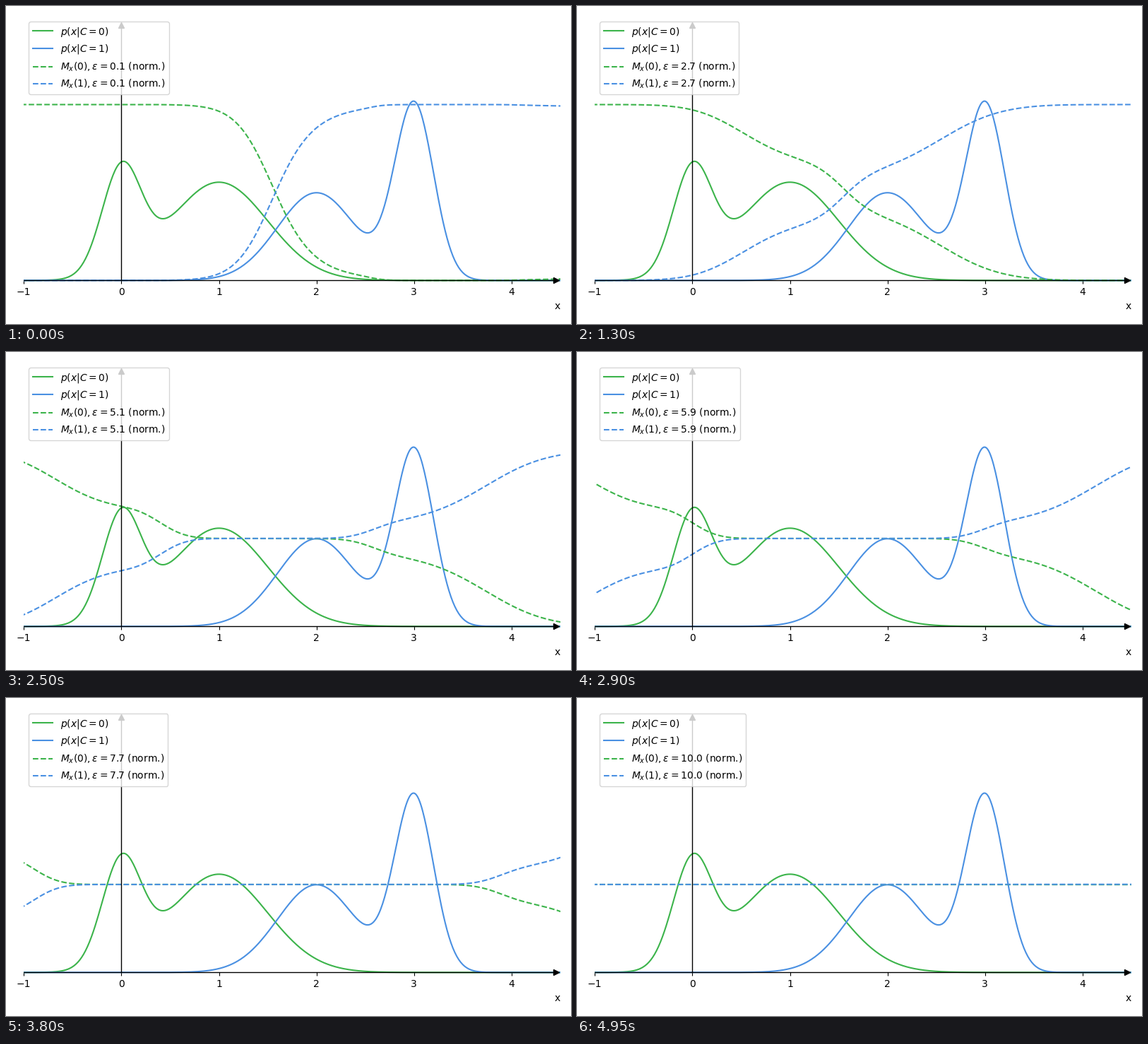
These frames come from a looping animation (800 px wide and 450 px high, 5 s). A matplotlib script:

```python
import math

import numpy as np
import matplotlib.pyplot as plt
from matplotlib.animation import FuncAnimation

W, H, DPI = 800, 450, 100
FRAMES, INTERVAL = 100, 50
GREEN, BLUE = "#3cb44b", "#4a90e2"
X_MIN, X_MAX = -1, 4.5
Y_MIN, Y_MAX = -0.2, 1.5

# Gaussian mixtures: (weight, mean, standard deviation)
MIXTURES = (
    ((0.3, 0, 0.2), (0.7, 1, 0.5)),
    ((0.5, 2, 0.4), (0.5, 3, 0.2)),
)

erfc = np.vectorize(math.erfc)
x = np.linspace(-2, 5, 700)  # runs past the visible range on both sides


def density(mix):
    return sum(w / (s * math.sqrt(2 * math.pi)) * np.exp(-0.5 * ((x - m) / s) ** 2)
               for w, m, s in mix)


def cdf(mix, t):
    return sum(w * 0.5 * erfc((m - t) / (s * math.sqrt(2))) for w, m, s in mix)


def window_mass(mix, eps):
    return cdf(mix, x + eps / 2) - cdf(mix, x - eps / 2)


def mass_label(c, eps):
    return rf"$M_x({c}), \epsilon={eps:.1f}$ (norm.)"


plt.rcParams["font.family"] = "DejaVu Sans"
fig = plt.figure(figsize=(W / DPI, H / DPI), dpi=DPI)

# Axes box in pixels; unit is the height of one y unit
left, right, top, unit = 25.25, 785, 15, 248.9
height = (Y_MAX - Y_MIN) * unit
ax = fig.add_axes([left / W, 1 - (top + height) / H, (right - left) / W, height / H])
ax.spines["bottom"].set_position("zero")
for spine in ax.spines.values():
    spine.set_visible(False)
ax.set_xlim(X_MIN, X_MAX)
ax.set_ylim(Y_MIN, Y_MAX)
ax.set_xticks(range(-1, 5))
ax.set_yticks([])
ax.set_xlabel("x", loc="right")

for c, color in enumerate((GREEN, BLUE)):
    ax.plot(x, density(MIXTURES[c]), color=color, label=f"$p(x|C={c})$")
mass_lines = [ax.plot(x, 0 * x, "--", color=color, label=mass_label(c, 0.1))[0]
              for c, color in enumerate((GREEN, BLUE))]

# Axis lines with arrowheads
axis_style = dict(color="black", lw=1, markersize=6, markevery=[1], zorder=3)
ax.plot([X_MIN, 4.46], [0, 0], marker=">", **axis_style)
ax.plot([0, 0], [0, 1.45], marker="^", **axis_style)

legend = ax.legend(loc="upper left")
mass_texts = legend.get_texts()[2:]


def update(i):
    eps = 0.1 * (i + 1)
    masses = [window_mass(mix, eps) for mix in MIXTURES]
    total = masses[0] + masses[1]
    for c in range(2):
        mass_lines[c].set_ydata(masses[c] / total)
        mass_texts[c].set_text(mass_label(c, eps))
    return mass_lines + mass_texts


anim = FuncAnimation(fig, update, frames=FRAMES, interval=INTERVAL,
                     repeat=True, repeat_delay=0, blit=False)
plt.show()
```
